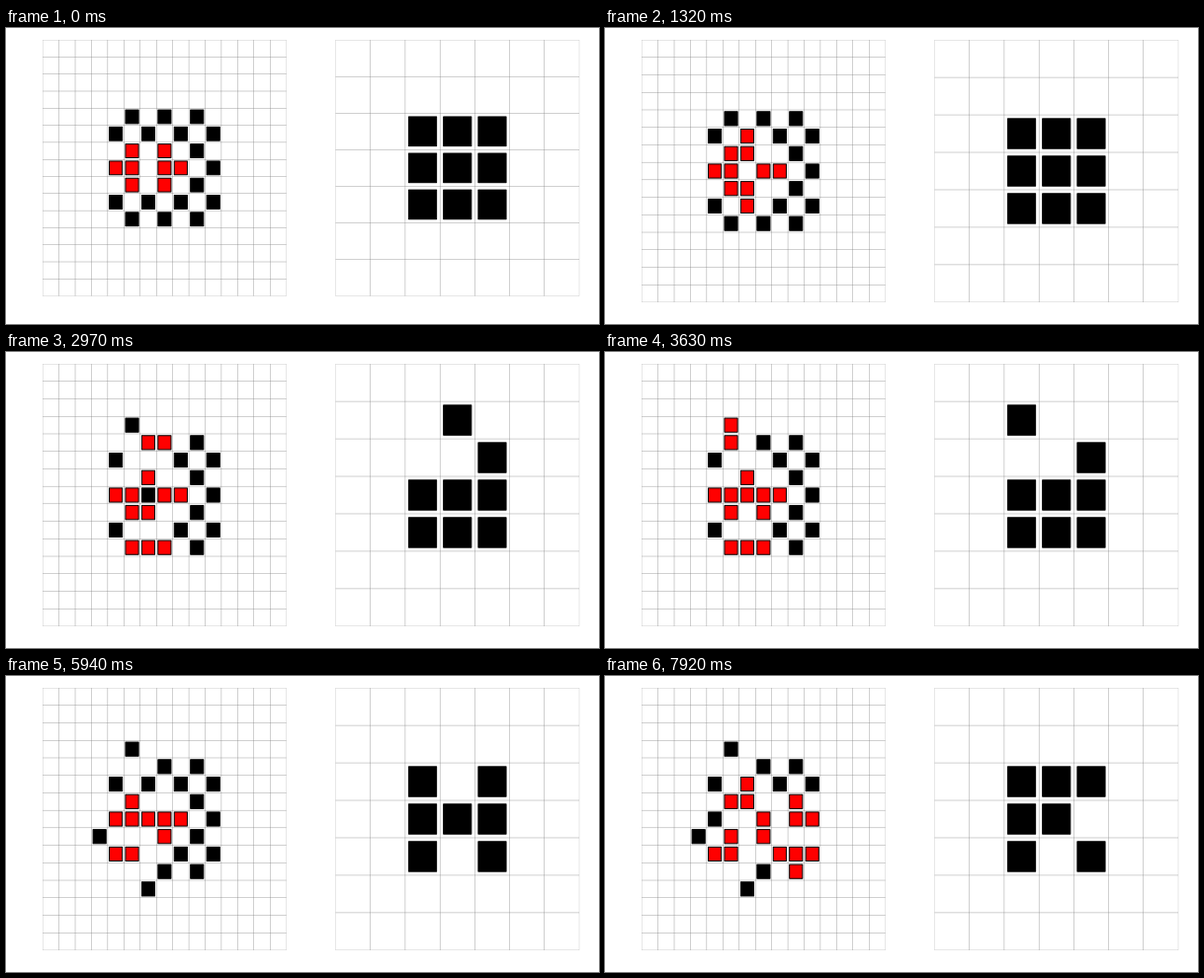
Animation, 600 px wide and 300 px high, one loop 8000 ms. Source, as a matplotlib script:

```python
import matplotlib.pyplot as plt
from matplotlib.animation import FuncAnimation
from matplotlib.collections import LineCollection, PolyCollection

W, H, DPI = 600, 300, 100
PX = 72 / DPI                      # one pixel in points
TICK, HOLD, LOOP = 10, 330, 8000   # ms
FINE, COARSE = 15, 7
PANEL_W, TOP = 246.5, 12.1
LEFT_X, RIGHT_X = 37.15, 333.5
FIRST_BOTTOM, BOTTOM = 271.6, 277.9

UP, DOWN, LEFT, RIGHT = (-1, 0), (1, 0), (0, -1), (0, 1)

# one particle (row, column) hops one cell per step
MOVES = [
    ((8, 7), LEFT), ((6, 7), LEFT), ((7, 5), RIGHT), ((7, 6), LEFT),
    ((9, 6), DOWN), ((7, 5), RIGHT), ((6, 5), DOWN), ((5, 6), UP),
    ((4, 5), UP), ((4, 6), LEFT), ((8, 6), RIGHT), ((4, 5), DOWN),
    ((10, 5), UP), ((10, 6), DOWN), ((5, 5), DOWN), ((8, 5), LEFT),
    ((6, 6), UP), ((8, 4), LEFT), ((7, 5), DOWN), ((7, 6), UP),
    ((7, 8), RIGHT), ((8, 9), DOWN), ((6, 6), DOWN), ((7, 6), UP),
]


def start_cells():
    cells = {(r, c) for r in range(4, 11) for c in range(4, 11) if (r + c) % 2}
    return (cells - {(7, 6)}) | {(7, 5), (7, 7)}


def all_states():
    cells = start_cells()
    states = [sorted(cells)]
    for (r, c), (dr, dc) in MOVES:
        cells = (cells - {(r, c)}) | {(r + dr, c + dc)}
        states.append(sorted(cells))
    return states


def colour(cell, cells):
    """Red while partly surrounded, black when alone or fully enclosed."""
    r, c = cell
    near = sum((r + dr, c + dc) in cells for dr, dc in (UP, DOWN, LEFT, RIGHT))
    return "red" if 0 < near < 4 else "black"


def coarse(cells):
    """Blocks of 2 x 2 fine cells holding at least two particles."""
    count = {}
    for r, c in cells:
        key = ((r - 1) // 2, c // 2)
        count[key] = count.get(key, 0) + 1
    return [key for key, n in count.items() if n >= 2]


def tiles(cells, x0, n, bottom):
    w, h = PANEL_W / n, (bottom - TOP) / n
    out = []
    for r, c in cells:
        xa, xb = x0 + (c + 0.1) * w, x0 + (c + 0.9) * w
        ya, yb = TOP + (r + 0.1) * h, TOP + (r + 0.9) * h
        out.append([(xa, ya), (xb, ya), (xb, yb), (xa, yb)])
    return out


def grid(x0, n, bottom):
    """Grid lines with their widths; the outer ones are half as strong."""
    lines, widths = [], []
    for i in range(n + 1):
        x = x0 + PANEL_W * i / n
        y = TOP + (bottom - TOP) * i / n
        lines += [[(x, TOP), (x, bottom)], [(x0, y), (x0 + PANEL_W, y)]]
        widths += [(0.18 if i in (0, n) else 0.36) * PX] * 2
    return lines, widths


def scene(step, cells):
    bottom = BOTTOM if step else FIRST_BOTTOM
    blocks = coarse(cells)
    squares = (tiles(cells, LEFT_X, FINE, bottom)
               + tiles(blocks, RIGHT_X, COARSE, bottom))
    fills = [colour(p, cells) for p in cells] + ["black"] * len(blocks)
    (la, wa), (lb, wb) = grid(LEFT_X, FINE, bottom), grid(RIGHT_X, COARSE, bottom)
    return la + lb, wa + wb, squares, fills


scenes = [scene(i, cells) for i, cells in enumerate(all_states())]

fig = plt.figure(figsize=(W / DPI, H / DPI), dpi=DPI, facecolor="white")
ax = fig.add_axes([0, 0, 1, 1])
ax.set_xlim(0, W)
ax.set_ylim(H, 0)
ax.axis("off")

mesh = LineCollection([], colors="#7f7f7f", snap=False)
squares = PolyCollection([], edgecolors="black", linewidths=PX, snap=False)
ax.add_collection(mesh, autolim=False)
ax.add_collection(squares, autolim=False)


def draw(frame):
    step = min(frame * TICK // HOLD, len(scenes) - 1)
    lines, widths, verts, fills = scenes[step]
    mesh.set_segments(lines)
    mesh.set_linewidths(widths)
    squares.set_verts(verts)
    squares.set_facecolor(fills)
    return mesh, squares


anim = FuncAnimation(fig, draw, frames=LOOP // TICK, interval=TICK,
                     init_func=lambda: draw(0), repeat=True, repeat_delay=0,
                     cache_frame_data=False)
plt.show()
```
